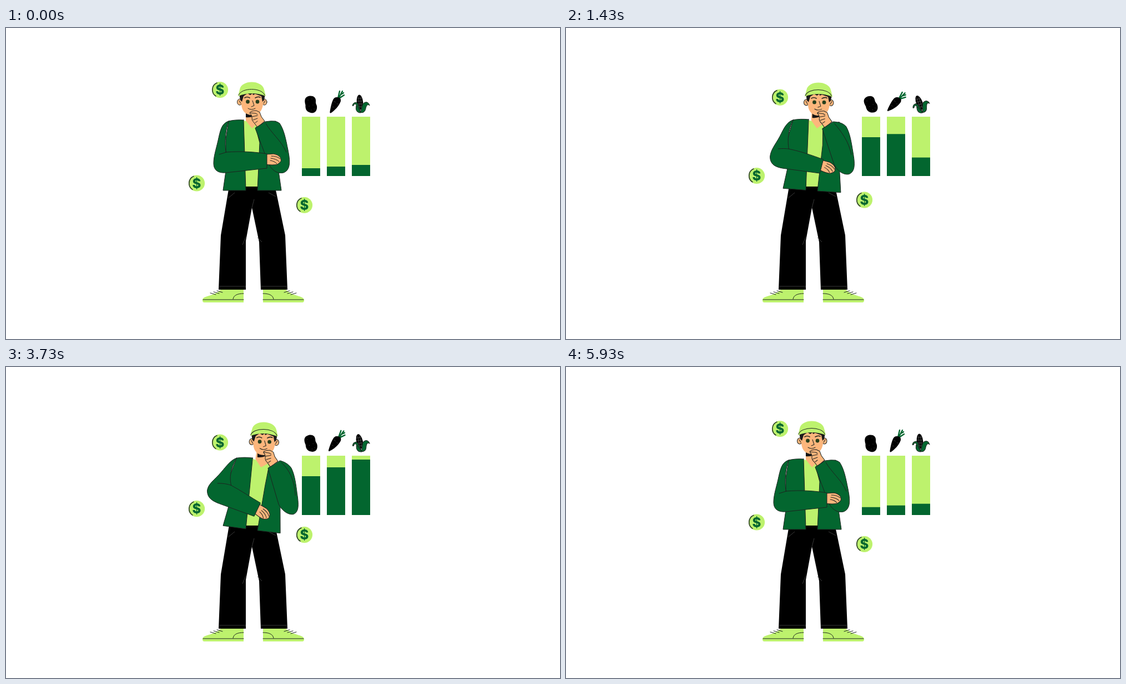
An HTML page that plays this animation: 998x561 px, repeating every 6010 ms.

```html
<!DOCTYPE html>
<html lang="en">
<head>
<meta charset="utf-8">
<title>Thinking about crops</title>
<style>
  html, body { margin: 0; width: 100%; height: 100%; overflow: hidden; background: #fff; }
  svg { display: block; width: 998px; height: 561px; }
  .lime { fill: #bdf26d; }
  .green { fill: #03662f; }
  .skin { fill: #fcb67c; }
  .line { fill: none; }
  .ink { stroke: #1d2420; stroke-width: 1; stroke-linejoin: round; stroke-linecap: round; }
  .seam { fill: none; stroke: #484848; stroke-width: .8; }
  .coin text { font: 800 24px Inter, Roboto, sans-serif; text-anchor: middle; fill: #03662f; }
</style>
</head>
<body>
<svg viewBox="0 0 998 561">
  <defs>
    <g id="shoe">
      <path class="lime" d="M387 472H428V495H357Q354 495 354 491C354 482 374 485 387 472Z"/>
      <path class="line ink" d="M355 490H428M409 489C410 482 417 479 428 479M368 478L378 481M374 476L384 479M380 474L390 477"/>
    </g>
    <g id="coin" class="coin">
      <circle class="lime" r="14.6"/>
      <path class="line" stroke="#31442b" stroke-width="1.7" d="M-5 -12.7A13.7 13.7 0 0 0 -7 11.8"/>
      <text y="8.7">$</text>
    </g>
  </defs>

  <use href="#shoe"/>
  <use href="#shoe" transform="matrix(-1 0 0 1 891 0)"/>
  <path d="M402 285H484L487 297L503 374L507 472H459L456 386L443 324L432 384V472H383L387 374L400 297Z"/>
  <path class="seam" d="M412 297L400 307M473 297L486 304M447 309L443 324M432 377L426 391M453 378L461 386M384 466H432M459 466H506"/>

  <path class="lime" d="M427 167L460 172L455 286H430Z" data-to="M443 165L477 176L456 286H430Z"/>
  <path class="skin" d="M432 152L432 167L443 181L453 172L450 152Z" data-to="M452 154L450 166L460 181L473 174L473 154Z"/>

  <g id="head">
    <path fill="#151515" d="M432 152V161Q439 162 446 159L444 155Z"/>
    <g class="skin ink">
      <ellipse cx="421" cy="133.500" rx="4.500" ry="5.500"/>
      <ellipse cx="465.500" cy="133.500" rx="4.500" ry="5.500"/>
    </g>
    <path class="skin" d="M424 117V138C425 151 433 157 443 157C455 157 462 150 463 137V117Z"/>
    <path fill="#1b1b1b" d="M420 119L440 114L467 119L465 130L462 133L460 123L449 119L445 121L444 118L440 121L435 118L428 123L425 133L422 130Z"/>
    <path class="lime" d="M418 123L421 111C424 93 461 93 465 111L468 123Q443 113 418 123Z"/>
    <path class="line ink" d="M419 121C424 107 461 107 466 121M420 131L423 136M467 131L464 136"/>
    <path class="line ink" style="stroke-width:1.600" d="M430 126Q434 123 439 126M449 126Q454 123 458 125"/>
    <g fill="#263f1c">
      <circle cx="435.500" cy="133" r="3.400"/>
      <circle cx="453" cy="133" r="3.400"/>
    </g>
    <path class="line ink" d="M444 131L447 140L442 142M436 145Q442 149 449 145"/>
  </g>

  <path class="green ink" d="M428 166L432 293L391 293L396 258L396 200L401 168Q413 165 428 166Z"
    data-to="M445 164L432 292L391 286L401 252L402 200L416 164Q430 162 445 164Z"/>
  <path class="green ink" d="M450 180L457 207L453 293L496 293L491 258L495 200L486 168L467 170Z"
    data-to="M474 182L467 215L453 295L494 300L494 250L512 200L498 171L490 175Z"/>

  <g id="fist" class="skin ink">
    <path d="M439 153Q441 149 451 149L457 152L460 160L466 168L453 179L447 171Q442 167 443 161L442 157Z"/>
    <path class="line" d="M440 153L450 154L453 156M443 160L453 158M445 166L453 163M449 171L453 168"/>
  </g>
  <path class="green ink" d="M467 169C475 168 486 166 493 172C501 184 504 200 508 220C512 240 513 256 500 261C488 264 477 255 472 242L449 181Z"
    data-to="M495 169C502 171 510 175 515 183C521 195 523 212 525 228C528 248 529 262 518 266C508 267 497 258 492 248L473 183Z"/>
  <path class="line ink" d="M468 172C478 190 496 203 505 224" data-to="M497 172C512 185 521 205 522 232"/>

  <g id="hand" class="skin ink">
    <path d="M468 228L482 227Q490 228 494 233Q497 239 494 242L489 246Q480 248 468 246Z"/>
    <path class="line" d="M478 231Q488 231 494 236M477 235Q487 236 492 241M476 239Q484 240 488 245"/>
  </g>
  <path class="green ink" d="M401 168C388 172 386 185 382 203C378 220 374 232 374 244C374 258 384 262 396 261L470 253L470 227C445 223 425 222 396 224C394 205 395 185 401 168Z"
    data-to="M416 164C405 168 398 178 388 189C375 204 364 209 362 222C362 236 372 241 384 246L446 270L458 246C440 235 425 224 406 213C403 200 404 185 416 164Z"/>
  <path class="line ink" d="M384 228L397 224" data-to="M381 209Q396 209 406 213"/>

  <g id="coins">
    <use href="#coin"/><use href="#coin"/><use href="#coin"/>
  </g>

  <g class="lime">
    <rect x="533" y="160" width="33" height="107"/>
    <rect x="578" y="160" width="33" height="107"/>
    <rect x="623" y="160" width="33" height="107"/>
  </g>
  <g id="levels" class="green">
    <rect x="533" width="33"/><rect x="578" width="33"/><rect x="623" width="33"/>
  </g>

  <g id="potato">
    <path d="M547 122.500C556 122 559 127 558 134C558 138 561 139 560 145C559 152 554 154 549 153C541 151 539 146 539.500 139C537 130 538 124 547 122.500Z"/>
    <path class="line" stroke="#555" stroke-linecap="round" d="M544 130h.1M551 128h.1M546 141h.1M553 139h.1M550 148h.1M555 146h.1"/>
  </g>
  <g id="carrot">
    <path class="line" stroke="#03662f" stroke-width="2.400" stroke-linecap="round" d="M598 127L601 114M599 127L606 114M600 127L609 121M603 120L608 117"/>
    <path d="M590 128Q593 124 598 125Q604 126 603 132C600 141 592 149 585 153.500Q583 154 583.500 151C585 142 587 133 590 128Z"/>
    <path class="line" stroke="#444" stroke-width=".7" d="M590 132L594 134M599 138L596 136M588 142L591 143"/>
  </g>
  <g id="corn">
    <ellipse cx="637.500" cy="134" rx="5.800" ry="13.500" transform="rotate(-5 637.500 134)"/>
    <path class="line" stroke="#666" stroke-width=".6" d="M635 123L637 146M639 122L640 146M633 127H641M632 132H642M632 137H643M633 142H643"/>
    <g class="green ink" stroke-width=".7">
      <path d="M639 152C631 150 634 138 629 137C626 137 627 142 624 140C625 134 632 132 634 137C636 143 638 147 639 152Z"/>
      <path d="M638 152C642 147 640 138 645 135C650 132 654 135 655 140C651 136 649 141 648 145C647 152 642 154 638 152Z"/>
      <path d="M631 140C629 148 632 153 639 153C637 148 635 143 631 140Z"/>
    </g>
  </g>
</svg>

<script>
  const LOOP = 6010, CYCLE = 6000;
  const POSE_B = 0.889;             // share of the lean at which data-to is reached
  const $ = id => document.getElementById(id);
  const wave = x => (1 - Math.cos(2 * Math.PI * x)) / 2;
  const ease = x => wave(Math.min(1, Math.max(0, x)) / 2);
  const place = (id, value) => $(id).setAttribute('transform', value);

  const numbers = /-?\d+(\.\d+)?/g;
  const segment = d => d.match(/[A-Z][^A-Z]*/g);

  // Both poses get the same commands: a line or quadratic becomes a cubic where they differ.
  function unify(d) {
    let x = 0, y = 0;
    return segment(d).map(part => {
      const n = (part.match(numbers) || []).map(Number);
      const type = part[0];
      if (type === 'Z') return part;
      if (type === 'M') { [x, y] = n; return part; }
      const [ex, ey] = type === 'H' ? [n[0], y] : n.slice(-2);
      let c = n;
      if (type === 'Q') {
        const [qx, qy] = n;
        c = [x + (qx - x) * 2 / 3, y + (qy - y) * 2 / 3, ex + (qx - ex) * 2 / 3, ey + (qy - ey) * 2 / 3, ex, ey];
      } else if (type !== 'C') {
        c = [x + (ex - x) / 3, y + (ey - y) / 3, ex - (ex - x) / 3, ey - (ey - y) / 3, ex, ey];
      }
      [x, y] = [ex, ey];
      return 'C' + c.map(v => v.toFixed(2)).join(' ');
    }).join('');
  }

  const morphs = [...document.querySelectorAll('[data-to]')].map(el => ({
    el,
    from: unify(el.getAttribute('d')),
    to: unify(el.dataset.to).match(numbers).map(Number)
  }));

  const coins = [[385.5, 111.5, 28.7], [343.5, 280, -28.5], [537.5, 319.5, -19.8]];
  const levels = [[253, 197, 0], [250, 181, 530], [247, 167, 1120]];
  const RISE = 1230;

  function draw(time) {
    const lean = wave(time / CYCLE);
    const k = lean / POSE_B;

    for (const { el, from, to } of morphs) {
      let i = 0;
      el.setAttribute('d', from.replace(numbers, a => (+a + (to[i++] - a) * k).toFixed(2)));
    }
    place('head', `translate(${22.3 * k} ${2 * k}) rotate(${1.5 * k} 443 140)`);
    place('fist', `translate(${25 * k} ${1.5 * k}) rotate(${3 * k} 453 165)`);
    place('hand', `translate(${-18 * k} ${20 * k}) rotate(${36 * k} 470 238)`);

    coins.forEach(([x, y, travel], i) =>
      $('coins').children[i].setAttribute('transform', `translate(${x} ${y + travel * lean})`));

    const fall = ease((time - (CYCLE - RISE)) / RISE);
    levels.forEach(([low, high, start], i) => {
      const top = low + (high - low) * ease((time - start) / RISE) * (1 - fall);
      const bar = $('levels').children[i];
      bar.setAttribute('y', top);
      bar.setAttribute('height', 267 - top);
    });

    const tilt = 15 * wave(time / 3000);
    place('potato', `rotate(${-tilt} 549 138)`);
    place('carrot', `rotate(${tilt} 596 133)`);
    place('corn', `rotate(${-tilt} 640 138)`);
  }

  // Twenty poses a second, shown in uneven holds of 30 and 70 ms.
  const begin = performance.now();
  function tick() {
    const t = (performance.now() - begin) % LOOP;
    const step = Math.min(119, 2 * Math.floor(t / 100) + (t % 100 >= 30 ? 1 : 0));
    draw(step * 50);
    requestAnimationFrame(tick);
  }
  tick();
</script>
</body>
</html>
```
